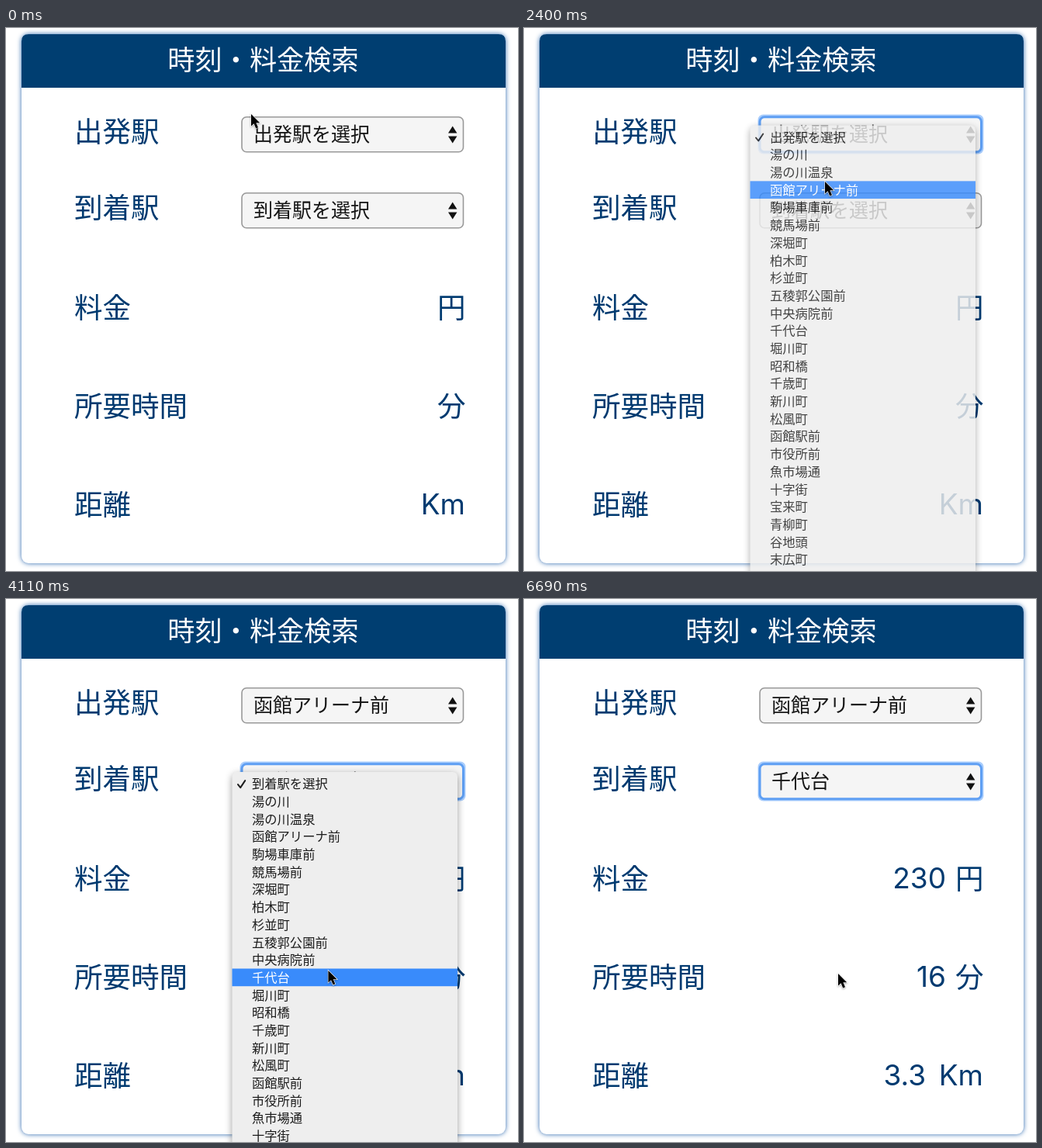
Animation of 660x700 px, one loop 6720 ms. Source, as an HTML page:

```html
<!DOCTYPE html>
<html lang="ja">
<head>
<meta charset="utf-8">
<style>
  html, body { margin: 0; width: 100%; height: 100%; overflow: hidden; background: #fff; }
  svg { display: block; font-family: "Noto Sans CJK JP", "Noto Sans CJK", sans-serif; }
  .label { font-size: 36.5px; fill: #003a70; }
  .value { font: 37px Inter, sans-serif; fill: #003a70; text-anchor: end; }
  .select { font-size: 25px; fill: #151515; }
  .menu { font-size: 16.3px; fill: #1c1c1c; }
  .card { filter: drop-shadow(0 0 3px #2a66ad); }
  .panel { filter: drop-shadow(0 3px 5px #0006); }
  .pointer { filter: drop-shadow(0 1px 1px #0005); }
</style>
</head>
<body>
<svg id="stage" width="660" height="700" viewBox="0 0 660 700"></svg>
<script>
const LOOP = 6720, PITCH = 22.69, GAP = 97.6;
const stations = ("湯の川 湯の川温泉 函館アリーナ前 駒場車庫前 競馬場前 深堀町 柏木町 杉並町 " +
  "五稜郭公園前 中央病院前 千代台 堀川町 昭和橋 千歳町 新川町 松風町 函館駅前 市役所前 " +
  "魚市場通 十字街 宝来町 青柳町 谷地頭 末広町").split(" ");

const picks = [
  { prompt: "出発駅を選択", choice: 3, open: 930, blur: 2970, flash: 2280, fade: 2370 },
  { prompt: "到着駅を選択", choice: 11, open: 3000, blur: LOOP, flash: 4740, fade: 4860 }
];
const FADE = 180, FLASH = 60;

// time, x, y of the pointer tip
const path = [
  [0, 316, 111], [150, 316, 111], [780, 390, 138], [1000, 390, 138],
  [1350, 388, 164], [1900, 388, 164], [2200, 388, 198], [2480, 388, 198],
  [2820, 400, 236], [3030, 400, 236], [3500, 420, 443], [3700, 420, 443],
  [4300, 414, 490], [5700, 414, 490], [6300, 405, 483], [LOOP, 405, 483]
];

const stage = document.getElementById("stage");

function add(parent, tag, attrs, text = "") {
  const el = document.createElementNS("http://www.w3.org/2000/svg", tag);
  for (const key in attrs) el.setAttribute(key, attrs[key]);
  el.textContent = text;
  return parent.appendChild(el);
}

const write = (parent, x, y, text, cls = "") => add(parent, "text", { x, y, class: cls }, text);

function buildSelect(pick, i) {
  const g = add(stage, "g", { transform: `translate(0 ${i * 98})` });
  pick.glow = add(g, "rect", { x: 301.5, y: 111.5, width: 291, height: 51, rx: 7, fill: "#a9cdfc" });
  pick.box = add(g, "rect", { x: 304, y: 114.7, width: 285.5, height: 45, rx: 6, fill: "#f5f5f5" });
  pick.text = write(g, 319, 146, pick.prompt, "select");
  add(g, "path", { d: "M570 135.5l5.7-9 5.7 9zm0 4h11.4l-5.7 9z", fill: "#111" });
}

function buildMenu(pick, i) {
  const g = pick.menu = add(stage, "g", { class: "menu", transform: `translate(0 ${i * GAP})` });
  add(g, "rect", { x: 291.5, y: 125.5, width: 290.5, height: 640, rx: 6, fill: "#eee", class: "panel" });
  pick.bar = add(g, "rect", { x: 291.5, width: 290.5, height: PITCH, fill: "#398bfb" });
  pick.rows = [pick.prompt, ...stations].map((name, n) =>
    write(g, 317, 146.7 + n * PITCH, name));
  pick.check = add(g, "path", {
    d: "M299 141.5l3.2 4 6-9", fill: "none", "stroke-width": 2,
    "stroke-linecap": "round", "stroke-linejoin": "round"
  });
}

add(stage, "rect", { x: 20, y: 8, width: 624, height: 682, rx: 9, fill: "#fff", class: "card" });
add(stage, "path", { d: "M20 77V17q0-9 9-9H635q9 0 9 9V77z", fill: "#003e71" });
add(stage, "text", {
  x: 331.5, y: 54, "text-anchor": "middle", "font-size": 35.2, fill: "#fff"
}, "時刻・料金検索");

[["出発駅", 147], ["到着駅", 245], ["料金", 373.5], ["所要時間", 500.5], ["距離", 627.5]]
  .forEach(([name, y]) => write(stage, 88, y, name, "label"));
write(stage, 556, 373.5, "円", "label");
write(stage, 556, 500.5, "分", "label");
write(stage, 592, 627, "Km", "value");

const results = add(stage, "g", {});
write(results, 544, 372.5, "230", "value");
write(results, 544, 499.5, "16", "value");
write(results, 518, 627, "3.3", "value");

picks.forEach(buildSelect);
picks.forEach(buildMenu);
const pointer = add(stage, "path", {
  d: "M0 0V15.5L3.6 12.2 6.2 18.4 9 17.2 6.4 11.2H11.2z",
  fill: "#000", stroke: "#fff", "stroke-width": 1.2, "paint-order": "stroke", class: "pointer"
});

function pointerAt(t) {
  const k = path.findIndex(p => p[0] > t);
  const [t0, x0, y0] = path[k - 1], [t1, x1, y1] = path[k];
  const u = (t - t0) / (t1 - t0), e = u * u * (3 - 2 * u);
  return [x0 + (x1 - x0) * e, y0 + (y1 - y0) * e];
}

function drawPick(pick, i, t, y) {
  const focused = t >= pick.open && t < pick.blur;
  pick.glow.setAttribute("visibility", focused ? "visible" : "hidden");
  pick.box.setAttribute("stroke", focused ? "#5f9ff3" : "#999");
  pick.box.setAttribute("stroke-width", focused ? 3 : 1.6);
  pick.text.textContent = t > pick.fade + FADE / 2 ? stations[pick.choice - 1] : pick.prompt;

  const alpha = t < pick.open ? 0 : Math.min(1, Math.max(0, 1 - (t - pick.fade) / FADE));
  pick.menu.setAttribute("opacity", alpha);
  const top = 129.3, flashing = t >= pick.flash && t < pick.flash + FLASH;
  const row = t < pick.flash ? Math.max(0, Math.floor((y - top - i * GAP) / PITCH)) : pick.choice;
  pick.bar.setAttribute("y", top + row * PITCH);
  pick.bar.setAttribute("opacity", flashing ? 0.65 : 1);
  pick.rows.forEach((el, n) => el.setAttribute("fill", n === row ? "#fff" : "#1c1c1c"));
  pick.check.setAttribute("stroke", row === 0 ? "#fff" : "#1c1c1c");
}

const start = performance.now();
function frame() {
  const t = (performance.now() - start) % LOOP;
  const [x, y] = pointerAt(t);
  picks.forEach((pick, i) => drawPick(pick, i, t, y));
  results.setAttribute("visibility", t > picks[1].fade + FADE / 2 ? "visible" : "hidden");
  pointer.setAttribute("transform", `translate(${x} ${y})`);
  requestAnimationFrame(frame);
}
frame();
</script>
</body>
</html>
```
